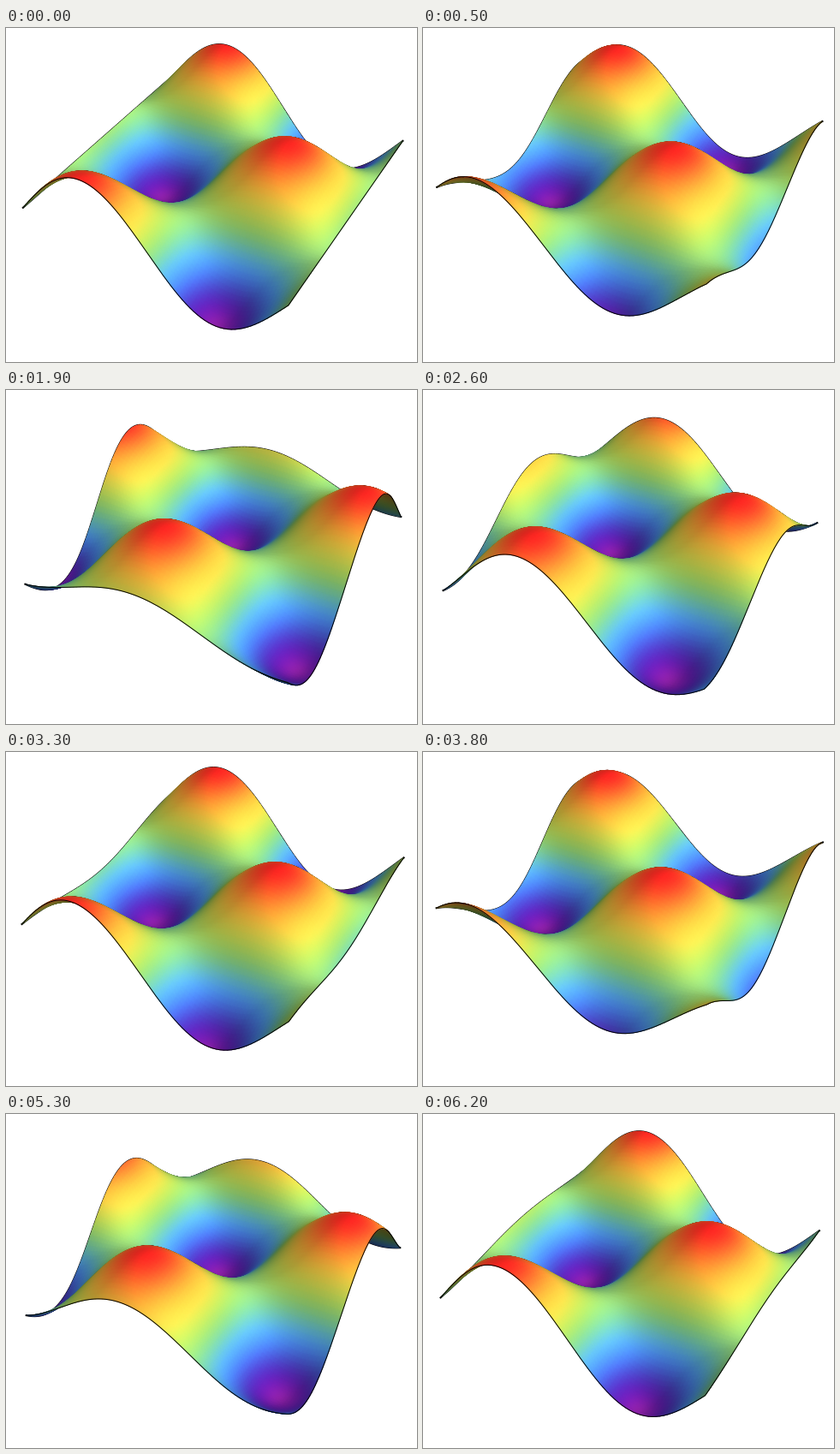
A matplotlib script for the animation above (6.3 s loop, 480x390 px).

```python
import numpy as np
import matplotlib.pyplot as plt
from matplotlib.animation import FuncAnimation

W, H, DPI = 480, 390, 100
FRAMES, INTERVAL, STEP = 63, 100, 0.1
N = 72                    # cells per side
HALF, AMP = 0.4808, 0.2   # half width and wave height in box units
SCALE, CX, CY = 1149, 251.9, 169.0
AMBIENT, DIFFUSE = 0.35, 0.37


def unit(v):
    return v / np.linalg.norm(v)


# Perspective camera looking at the box centre
EYE = np.array([1.3, -2.4, 2.0])
DIST = np.linalg.norm(EYE)
TOWARD = unit(EYE)
RIGHT = unit(np.cross([0, 0, 1], TOWARD))
VIEW = np.stack([RIGHT, np.cross(TOWARD, RIGHT), TOWARD])

# Three lights fixed to the view: from the left, the middle and below
LIGHTS = [unit(np.array([x, y, 1.5])) @ VIEW
          for x, y in ((-0.5, 1.5), (1.5, 1.5), (1.5, -0.5))]

# Rows run from the far side to the near side, columns from left to right,
# so that painting in grid order hides what lies behind
knots = np.linspace(-np.pi, np.pi, N + 1)
U, V = np.meshgrid(knots, knots[::-1])


def surface(t):
    """Points and upward unit normals of the moving wave."""
    k = HALF / np.pi
    p = np.stack([U * k, V * k, AMP * np.sin(U + t) * np.cos(V + t)], axis=-1)
    n = np.stack([-AMP / k * np.cos(U + t) * np.cos(V + t),
                  AMP / k * np.sin(U + t) * np.sin(V + t),
                  np.ones_like(U)], axis=-1)
    return p, n / np.linalg.norm(n, axis=-1, keepdims=True)


def project(p):
    x, y, z = np.moveaxis(p @ VIEW.T, -1, 0)
    f = SCALE / (DIST - z)
    return CX + x * f, CY - y * f


def rainbow(h):
    """Violet to red for heights from 0 to 1, as smooth curves per channel."""
    r = (0.472 - 0.567 * h + 4.05 * h**2) / (
        1 + 8.72 * h - 19.17 * h**2 + 14.1 * h**3)
    g = (0.109 - 1.226 * h + 27.284 * h**2 - 98.577 * h**3
         + 163.3 * h**4 - 131.395 * h**5 + 40.634 * h**6)
    b = 0.57 - 0.45 * h + 0.42 * np.exp(-((h - 0.28) / 0.17)**2)
    return np.stack([1.06 * r, 1.06 * g, b], axis=-1)


def shade(p, n):
    facing = np.sum(n * (EYE - p), axis=-1, keepdims=True)
    n = np.where(facing < 0, -n, n)
    light = AMBIENT + DIFFUSE * sum(np.clip(n @ d, 0, None) for d in LIGHTS)
    rgb = rainbow(p[..., 2] / AMP / 2 + 0.5) * light[..., None]
    return np.clip(rgb, 0, 1)


fig = plt.figure(figsize=(W / DPI, H / DPI), dpi=DPI, facecolor="white")
ax = fig.add_axes([0, 0, 1, 1])
ax.set_xlim(0, W)
ax.set_ylim(H, 0)
ax.axis("off")

# The far border is half covered by the surface, the near one lies on top
far, = ax.plot([], [], color="black", lw=1.5, zorder=1)
near, = ax.plot([], [], color="black", lw=0.7, zorder=3)
meshes = []


def update(i):
    while meshes:
        meshes.pop().remove()
    p, n = surface(i * STEP)
    x, y = project(p)
    meshes.append(ax.pcolormesh(x, y, shade(p, n), shading="gouraud",
                                zorder=2))
    far.set_data(*(np.concatenate([a[::-1, 0], a[0]]) for a in (x, y)))
    near.set_data(*(np.concatenate([a[-1], a[::-1, -1]]) for a in (x, y)))
    return [far, near, *meshes]


anim = FuncAnimation(fig, update, frames=FRAMES, interval=INTERVAL,
                     repeat=True, repeat_delay=0)
plt.show()
```
